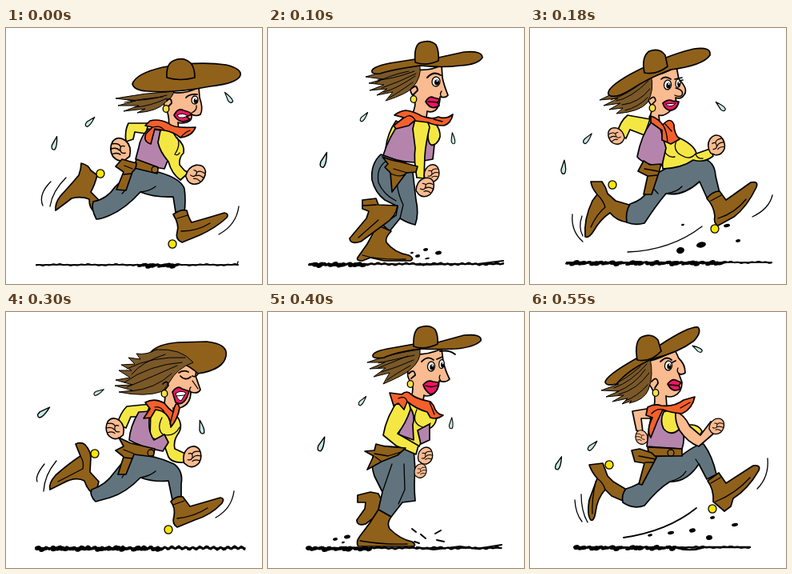
An HTML page with a canvas that plays this animation: 320 by 320 pixels, repeating every 0.6 s.

```html
<!DOCTYPE html>
<html lang="en">
<head>
<meta charset="utf-8">
<title>Running cowgirl</title>
<style>
html, body { margin: 0; width: 100%; height: 100%; overflow: hidden; background: #fff }
canvas { display: block; width: 100vw; height: 100vh }
</style>
</head>
<body>
<canvas width="320" height="320"></canvas>
<script>
const ctx = document.querySelector('canvas').getContext('2d');
ctx.lineCap = ctx.lineJoin = 'round';

function shape(d, color, width = 1.7) {
  const path = new Path2D(d);
  ctx.fillStyle = color;
  ctx.fill(path);
  ctx.lineWidth = width;
  ctx.strokeStyle = '#000';
  ctx.stroke(path);
}
const paint = (color, width) => (...paths) => paths.forEach(d => shape(d, color, width));
const brown = paint('#90611a'), mane = paint('#7a5828', 1), skin = paint('#fabb90');
const yellow = paint('#f5e743'), purple = paint('#b584ad'), orange = paint('#f4602b');
const pink = paint('#ea1762'), denim = paint('#61747e'), white = paint('#fff', 1);

function line(d, width = 1.3) {
  ctx.lineWidth = width;
  ctx.strokeStyle = '#000';
  ctx.stroke(new Path2D(d));
}

function oval(x, y, rx, ry, color, angle = 0, outline = true) {
  ctx.beginPath();
  ctx.ellipse(x, y, rx, ry, angle, 0, 7);
  ctx.fillStyle = color;
  ctx.fill();
  ctx.lineWidth = 1.3;
  ctx.strokeStyle = '#000';
  if (outline) ctx.stroke();
}
const spur = (x, y) => oval(x, y, 5, 5.2, '#ffe500');
const ring = (x, y) => oval(x, y, 3.8, 4.3, '#f9e23c');
const buckle = (x, y) => oval(x, y, 4, 4, '#98671d');
const clod = (x, y, rx, ry = rx * .6) => oval(x, y, rx, ry, '#000', -.2, false);

function eye(x, y, rx = 4, ry = 6) {
  oval(x, y, rx, ry, '#fff', .1);
  oval(x + 1, y + 1, rx * .6, ry * .6, '#000', 0, false);
  oval(x + 1.5, y - .8, .9, 1.1, '#fff', 0, false);
}

function at(x, y, angle, sx, sy, draw) {
  ctx.save();
  ctx.translate(x, y);
  ctx.rotate(angle);
  ctx.scale(sx, sy);
  draw();
  ctx.restore();
}
const drop = (x, y, angle, size = 1) => at(x, y, angle, size, size, () =>
  shape('M0,-8Q4,3 2,7Q-2,9 -2.5,3Z', '#c4e9e1', 1.2));
const fist = (x, y, dir = 1, size = 1, angle = 0) => at(x, y, angle, dir * size, size, () => {
  skin('M-10,9Q-13,-3 -5,-10Q4,-16 10,-9Q15,0 10,9Q3,17 -5,13Z');
  line('M10,-6Q3,-7 1,-3M12,0Q5,-2 2,2M10,6Q4,4 1,7M-4,-3Q2,-5 1,2Q0,6 -5,5');
});

function ground(x0, x1, y, width, bump, heavy0, heavy1) {
  let d = `M${x0},${y}`;
  for (let x = x0; x <= x1; x += 2)
    d += `L${x},${y + bump * Math.sin(x * .72) + .6 * Math.sin(x * .17)}`;
  line(d, width);
  line(`M${x0 + 1},${y}L${x1},${y}`, 1.6);
  for (let x = heavy0; x < heavy1; x += 5)
    clod(x, y + 1 + Math.sin(x * 1.7), 4, 2.2 + .8 * Math.sin(x));
}

const poses = [
  () => {
    ground(38, 290, 296, 1.8, .5, 168, 216);
    line('M289,296L290,292');
    line('M56,192Q40,208 46,222M75,187Q58,204 55,223M291,223Q288,246 266,258');
    drop(278, 87, -.6); drop(105, 117, .8); drop(61, 144, .3, 1.1);
    brown('M94,169Q103,171 106,178L114,184Q111,196 106,205L117,216L111,230Q104,226 104,214Q94,210 82,213Q69,223 62,228Q61,219 68,210Q81,196 91,184Q94,176 94,169Z');
    spur(118, 182);
    denim('M158,172Q170,178 190,180Q219,188 223,201Q225,215 223,230L212,230L209,211Q185,212 168,205Q149,226 130,234Q119,239 113,239Q106,226 109,217Q126,214 136,199L150,185Z');
    line('M168,205Q180,204 187,198M151,197Q149,204 145,207');
    brown('M209,233Q218,226 226,228Q228,237 232,243Q250,238 273,231Q279,232 276,237Q262,250 242,259L220,268Q211,264 214,255Q217,246 209,233Z');
    line('M219,254Q239,254 255,244M214,238L227,234');
    spur(208, 270);
    yellow('M178,119L153,119Q148,129 150,142L159,139L161,130L175,132Z');
    purple('M178,126Q168,136 166,149L162,164Q180,174 198,176L204,161Q196,150 194,128Z');
    yellow('M193,128Q205,122 213,137Q224,146 222,156Q216,162 217,171L223,178L228,181L218,190Q207,182 203,167Q192,154 190,143Z');
    line('M214,137Q219,146 211,158Q215,160 217,156');
    fist(144, 151, -1, 1.05); fist(237, 182, 1, .95, .5);
    brown('M163,164L190,174L189,182L160,175Z', 'M145,164L163,169Q163,176 158,180L150,203L138,202L147,180L137,173Z');
    line('M148,172L158,176M147,183L157,182'); buckle(186, 177);
    skin('M204,80Q223,84 241,74L242,87Q247,101 243,108Q238,111 232,108Q233,116 226,118Q218,120 215,118L216,128L203,127Q205,113 201,103Q195,98 199,87Z');
    orange('M180,116Q191,113 203,119Q210,126 237,124Q233,135 218,137Q210,130 198,128L186,126L181,145Q171,142 175,132L183,124L174,122Z');
    line('M184,124Q193,121 198,128M218,137Q224,130 230,128');
    mane('M210,79Q174,81 137,88L162,91L140,97L166,97L147,104L174,101L164,106Q190,104 199,93Q208,88 210,79Z');
    line('M201,84Q175,92 152,90M201,88Q180,98 161,99M196,86Q172,88 148,93', 1);
    line('M201,90Q207,86 207,94L203,98M225,87Q229,82 239,83', 1.8);
    ring(200, 101); eye(236, 90, 4, 5);
    line('M238,97Q239,103 232,106');
    pink('M210,109Q215,99 222,103Q231,105 232,108L226,111L230,114Q220,121 212,112Z');
    white('M214,109Q221,105 227,110Q222,113 217,112Z');
    brown('M158,70Q162,57 196,49Q240,41 275,46Q295,51 293,59Q290,69 255,73Q209,82 177,79Q160,78 158,70Z', 'M201,62Q200,45 209,41Q222,35 231,44Q236,50 236,62Q218,67 201,62Z');
  },
  () => {
    ground(52, 294, 295, 2.4, .8, 54, 120);
    line('M188,296L230,295L262,295L294,291', 2.2);
    clod(197, 277, 3); clod(213, 281, 4); clod(187, 285, 3); clod(180, 281, 2); clod(199, 288, 3, 1);
    drop(120, 111, .7, .9); drop(70, 165, .35, 1.25); drop(231, 138, -.1, .9);
    yellow('M160,116Q149,132 147,151L157,154L170,123Z', 'M200,112Q216,122 215,136Q212,148 199,147Z');
    purple('M168,113Q151,136 144,159Q160,167 183,168L206,164L208,146Q198,150 200,122L184,112Z');
    denim('M141,158Q128,170 130,190Q134,206 146,215L162,223L160,234L143,246L152,254L165,238Q175,244 184,246Q189,232 185,215L180,172Z');
    line('M150,165Q135,173 138,193Q144,208 160,216M163,182Q158,198 169,221L165,238');
    brown('M136,246L154,254Q146,262 148,268Q158,281 176,284Q184,288 178,291L145,291L128,287L118,291Q110,291 112,287L124,270Q131,258 136,246Z');
    line('M118,284Q138,290 172,289');
    brown('M118,215L135,213L138,221L162,222Q160,236 146,245L116,267Q103,271 102,263L123,238L126,229L118,226Z');
    line('M119,222L136,221M113,262L138,240');
    yellow('M185,109Q198,109 202,124Q197,145 196,160L195,188L186,187Q182,165 184,150L181,126Z');
    fist(204, 181, 1, .8); fist(196, 198, 1, .9, .3);
    brown('M143,161Q155,166 164,167L187,173L185,180L173,181L155,205L153,181L146,174L150,170Z');
    line('M157,176L174,181M153,182Q165,187 171,183');
    skin('M184,52Q204,54 217,46L218,62Q220,72 225,84Q222,88 215,86Q215,98 209,103Q204,106 199,104L198,112L180,108Q186,97 183,86Q177,82 178,73Z');
    orange('M172,103Q182,104 192,110Q205,115 213,111Q222,115 231,108Q229,119 220,122Q208,122 200,118L183,116L176,122L160,126L157,122L170,112L158,109Q164,104 172,103Z');
    line('M171,112Q178,106 184,115M207,114L218,117');
    mane('M190,47Q151,52 122,61L144,64L126,69L145,71L127,78L149,76L136,84L156,80L147,91Q175,82 181,74Q192,62 190,47Z');
    line('M183,54Q156,64 137,65M184,60Q161,76 145,80M176,54Q148,60 134,69M181,68Q164,80 152,87M185,57Q165,67 142,75', 1);
    ring(182, 89); eye(210, 67, 5, 6);
    line('M179,76Q186,69 187,78L182,83M199,62Q207,53 216,59', 2);
    line('M217,79Q214,83 217,86');
    pink('M197,92Q202,84 207,87L215,89L212,93L214,97Q204,104 197,92Z'); line('M200,92L212,93');
    brown('M130,55Q128,49 152,44L184,39L213,37L245,30Q268,28 268,37Q262,46 240,47Q220,50 190,47Q155,52 140,57Q131,58 130,55Z', 'M184,43Q182,21 191,18Q203,14 210,21Q214,29 213,41Q198,48 184,43Z');
  },
  () => {
    ground(46, 302, 293, 2, .5, 48, 246);
    line('M53,233Q51,254 66,267M65,235Q60,249 66,260M122,280Q176,278 215,248M303,209Q299,226 278,236');
    clod(214, 271, 6, 3.5); clod(188, 278, 5, 4); clod(260, 266, 3); clod(246, 247, 4, 2); clod(191, 246, 2);
    drop(238, 98, -.8); drop(72, 138, .7); drop(42, 174, .1, 1.1);
    brown('M76,192L90,192Q95,199 97,207L107,216L124,221L122,243Q108,241 100,231Q88,239 80,253Q74,263 69,261Q67,239 78,216L84,208Q77,200 76,192Z');
    line('M84,208Q92,216 94,224Q83,233 76,249'); spur(103, 196);
    denim('M160,181Q184,166 215,163Q231,166 232,185L237,206L221,212L212,192Q191,211 170,207Q158,221 143,244Q131,247 121,243Q119,230 125,220Q141,215 148,203Z');
    line('M170,207Q184,205 190,198M153,199L160,207');
    brown('M221,213Q228,204 237,204L245,215L276,193Q286,191 283,199Q271,224 255,236L235,247Q229,244 231,235Q230,223 221,213Z');
    line('M235,238Q257,231 270,214M226,216L239,209'); spur(231, 251);
    yellow('M150,114L122,109Q112,117 109,132L120,138L125,127L143,134Z');
    fist(108, 134, -1, .8, -.4);
    yellow('M162,125L188,138Q206,147 208,157L225,151L229,160Q218,169 204,165Q190,175 166,176Z');
    line('M183,141Q178,153 189,159Q200,166 207,157M166,151Q172,163 181,161M207,158Q210,164 216,163');
    fist(232, 146, 1, .9, -.3);
    purple('M152,117Q139,134 134,161Q143,172 165,172L170,150L162,123Z');
    brown('M142,166L150,171L164,170L161,181L152,208L142,208L147,185L135,179Z'); line('M143,176L160,179M148,185L159,184');
    skin('M149,61Q170,57 183,48L186,64Q198,76 193,83Q189,90 182,87Q185,97 176,103Q168,111 161,109L162,118L149,112Q154,103 151,96Q145,88 148,78Z');
    orange('M151,110Q160,113 166,121Q176,110 180,121Q180,132 187,139L176,145L165,140L165,128L151,118Z');
    line('M166,121Q171,128 172,143M169,120L177,129');
    mane('M151,58Q119,75 87,90L110,88L92,97L113,94L99,102L116,100L108,107Q137,105 147,93Q156,77 151,58Z');
    line('M148,66Q126,88 108,91M150,76Q136,94 115,96M142,67Q120,84 101,90M147,87Q135,99 119,103', 1);
    ring(153, 100); eye(172, 71, 4.5, 6); eye(185, 69, 3, 5.2);
    line('M150,89Q156,83 157,91L153,95M164,64Q169,59 176,64M181,64L190,62M187,66L191,65', 1.7);
    line('M182,75Q193,78 190,84Q187,87 181,84');
    pink('M166,94Q173,88 178,91L186,92Q184,103 174,103Q168,101 166,94Z');
    white('M170,95L182,94Q178,99 172,97Z');
    brown('M98,83Q95,75 125,58Q170,34 205,26Q227,23 225,34Q216,47 176,52Q147,63 126,77Q105,90 98,83Z', 'M143,56Q139,36 149,29Q162,24 169,34L172,48Q158,59 143,56Z');
  },
  () => {
    ground(38, 299, 295, 3, 1.5, 40, 195);
    line('M48,190Q36,205 39,212M63,186Q48,204 47,224M285,224Q282,246 262,257');
    drop(244, 144, -.2, 1.1); drop(116, 100, 1.1, .9); drop(47, 125, .9, 1.2);
    brown('M87,165Q94,162 99,166Q106,174 106,182L105,200L116,212L112,228Q103,226 98,211Q87,205 71,214L55,222Q53,214 62,204Q79,189 93,180Z');
    line('M93,180Q98,188 96,196L65,212'); spur(111, 177);
    denim('M155,177Q185,178 210,190Q222,199 219,215L219,234L208,235L203,211Q185,213 168,207Q150,226 130,232L112,237Q104,229 107,222Q125,216 135,201L148,185Z');
    line('M168,207Q180,205 187,199M151,198L145,207');
    brown('M206,237Q213,229 221,231L230,243L268,232Q274,233 270,239Q256,254 236,260L214,269Q207,265 210,255Q212,245 206,237Z');
    line('M214,258Q235,256 252,245M209,241L223,236'); spur(203, 272);
    yellow('M181,115L151,118Q143,126 139,140L150,145L156,131L174,131Z');
    fist(137, 145, -1, .95);
    yellow('M181,120Q205,116 211,127Q224,141 214,154Q209,162 211,171L224,177L222,188Q207,189 203,181L197,164L180,156Z');
    fist(232, 180, 1, .95);
    purple('M166,125Q155,143 154,160Q169,169 196,174L203,163L198,153L185,160Q175,146 181,124Z');
    line('M195,132Q188,146 196,153Q210,157 217,144');
    brown('M141,157L156,164L186,171L184,181L160,178L150,203L140,203L147,181L137,173L147,168Z');
    line('M147,172L162,178M148,182L158,183'); buckle(181, 176);
    skin('M230,58Q240,71 237,80L243,97Q240,103 231,100Q231,114 220,119Q211,122 209,120L210,128L196,122Q201,107 197,97Q195,83 205,75Z');
    orange('M174,113Q186,107 198,114Q203,121 209,125Q213,107 217,120Q215,133 206,144Q206,130 195,124L187,122L181,132L172,133L180,121Z');
    line('M186,119Q193,117 198,125M209,125L205,140');
    brown('M181,50Q190,40 215,38L251,37Q278,40 275,55Q272,72 240,77Q225,62 181,50Z');
    mane('M188,47Q219,45 234,63Q214,70 204,88L196,99Q175,107 141,100L158,98L136,92L158,91L137,85L155,82L141,73L157,73L144,66L161,65L153,57L168,59L163,52Q176,54 188,47Z');
    line('M224,57Q183,55 151,71M220,63Q179,66 148,88M214,67Q185,80 151,94M207,77Q187,96 156,99M199,53Q170,62 157,78', 1);
    ring(198, 102);
    line('M196,90Q202,84 203,92L199,97M218,80Q224,87 231,81M233,80Q238,82 240,77M216,76Q222,72 228,75', 1.7);
    line('M233,86L240,96M231,100Q228,97 231,94');
    pink('M208,100Q214,91 220,96L229,99L226,107Q220,118 212,113Z');
    white('M212,102Q218,97 225,101L219,111Q214,110 212,102Z');
    line('M213,105L223,104', 1);
  },
  () => {
    ground(49, 292, 295, 2.4, .7, 51, 128);
    line('M186,294L207,297L240,293L261,296L292,291', 2.2);
    line('M180,271L185,275M191,278L197,283M209,277L216,273M211,285L220,287M183,287L189,289', 2);
    clod(99, 281, 4); clod(84, 284, 3); clod(94, 288, 2);
    drop(118, 111, .7, .9); drop(67, 165, .4, 1.2); drop(229, 139, .1, .9);
    brown('M112,229L128,225L138,227L144,240L140,251L122,265Q111,268 111,260L121,246L122,238L112,238Z');
    denim('M137,167Q126,185 133,205L143,225L138,247L154,256L168,238L184,236Q182,215 184,198L182,170Z');
    line('M170,190L171,222L163,240M143,225L155,190');
    brown('M138,247L154,256Q148,264 152,271Q165,284 180,287Q187,292 180,293L113,293Q109,288 115,280Q128,264 138,247Z');
    line('M115,286Q143,291 174,290');
    fist(190, 198, 1, .65);
    yellow('M176,108Q206,115 211,130Q210,144 198,147L189,168L168,165L172,130Z');
    line('M186,122Q179,138 191,143Q199,147 203,139');
    purple('M177,118Q185,130 181,141L182,160L163,153Z', 'M187,148L202,140L202,160L191,165Z');
    yellow('M165,107Q177,108 178,122Q172,140 162,152L188,167L185,178L160,167L144,154Q148,130 165,107Z');
    fist(196, 179, 1, .78);
    brown('M135,165L146,168L172,170L162,179L142,187L124,197L132,180L121,174L133,173Z');
    line('M133,177L150,180L166,175M134,181L142,187');
    skin('M179,53Q200,54 217,46L219,61Q221,72 227,84Q222,89 214,86Q214,99 204,104Q197,106 195,104L194,111L179,105Q183,96 179,88Q173,81 175,74Z');
    orange('M152,101L167,103Q174,97 179,103Q186,109 203,112L207,117Q210,128 219,129Q211,135 203,132L199,125Q185,121 174,112L170,122L163,114L157,117Z');
    line('M163,108Q172,104 174,112M202,113L208,128');
    mane('M190,47Q157,51 124,63L146,63L127,71L147,70L132,81L152,76L144,90Q170,79 178,72Q192,60 190,47Z');
    line('M183,54Q155,60 138,64M182,60Q162,69 142,75M178,67Q160,77 149,85M175,55Q152,64 138,70', 1);
    ring(178, 90); eye(204, 68, 4.5, 6); eye(217, 65, 3.2, 5.5);
    line('M176,77Q183,70 184,79L179,83M192,62Q200,54 207,60M211,59L218,56M215,49Q227,47 234,53', 1.8);
    line('M215,79Q213,83 216,86');
    pink('M194,91Q200,84 206,87L213,88Q213,101 203,103Q196,98 194,91Z'); line('M197,92Q204,95 211,92');
    brown('M131,55Q130,49 155,45L183,40L212,38L245,29Q268,27 266,36Q258,44 235,46Q210,47 190,46Q160,50 145,57Q132,59 131,55Z', 'M182,43Q181,22 190,19Q202,15 209,22Q213,30 212,40Q196,48 182,43Z');
  },
  () => {
    ground(56, 275, 294, 2, .6, 58, 182);
    line('M180,294Q200,300 218,294L275,294', 2.4);
    line('M56,235Q57,252 65,262M64,228Q64,249 72,263M297,183Q299,206 284,221');
    line('M117,282Q172,274 208,245', 1.8);
    clod(176, 276, 4, 2); clod(203, 273, 4, 2.5); clod(224, 282, 4, 3); clod(228, 257, 3); clod(150, 279, 3, 1.5); clod(256, 266, 4, 2);
    drop(209, 46, -1, .9); drop(78, 167, .8); drop(36, 189, .4, 1.1);
    brown('M74,191L91,189L97,205L104,212L119,221L116,236L102,230L94,222Q84,233 82,250Q80,262 76,260Q71,254 74,235L84,208Q77,200 74,191Z');
    line('M84,208Q92,214 94,222M82,212Q77,236 78,252'); spur(99, 191);
    denim('M149,181L190,179Q208,165 217,165Q228,180 233,203L221,209L211,190Q196,213 175,212Q160,221 143,242Q129,247 116,238Q114,228 120,221Q137,216 145,207Z');
    line('M175,212Q190,208 195,199M211,190L207,184');
    brown('M222,211L236,201L245,214L279,192Q289,191 286,198Q272,222 254,233L251,243L243,249L229,237Q230,222 222,211Z');
    line('M232,237Q257,227 275,207M226,214L238,207'); spur(228, 246);
    skin('M152,120L128,124L133,148L141,150L139,133L152,133Z'); fist(140, 156, -1, .65);
    yellow('M190,143Q209,137 215,149Q211,161 196,158Z');
    purple('M153,122Q148,145 146,168L190,171Q194,160 191,146L181,123Z');
    yellow('M167,125Q178,119 184,129L186,147Q176,156 167,146Q162,136 167,125Z');
    skin('M182,125Q192,127 200,143L213,154L226,137L234,148L211,168Q197,163 187,148Q181,137 182,125Z');
    fist(233, 142, 1, .75, .3);
    brown('M147,169L190,171L190,180L149,180Z', 'M127,173L137,171L152,176L158,182L140,216L136,215L143,189L131,187Z');
    line('M136,180L157,184M144,188L155,188'); buckle(176, 176);
    skin('M147,62Q167,57 181,47L186,58Q194,65 194,76Q190,79 186,77L190,88Q190,101 180,105Q174,107 170,105L171,118L155,119Q158,104 152,95Q144,85 148,76Z');
    orange('M147,119Q156,114 164,117Q180,119 192,110L206,106Q203,121 190,127Q176,126 166,122L159,137L151,157Q145,147 153,132L145,129Z');
    line('M152,127Q160,119 167,123M188,120L200,113');
    mane('M150,58Q121,73 98,90L111,90L89,98L111,99L95,106L117,104L103,112L122,108L115,115L127,111L124,114Q143,110 148,97Q155,79 150,58Z');
    line('M146,65Q127,87 105,95M149,76Q134,97 111,103M138,68Q119,85 103,91M147,91Q134,106 119,111M144,72Q130,92 108,100', 1);
    ring(157, 101); eye(173, 67, 4.5, 6);
    line('M152,87Q159,79 160,89L156,95M163,62Q171,54 177,60M178,63L182,61', 1.8);
    line('M185,70Q183,74 186,77');
    pink('M172,90Q178,82 184,86L189,88L186,92L188,96Q178,102 172,90Z'); line('M174,91L186,92');
    brown('M94,88Q94,80 133,58L163,41Q198,18 210,19Q215,25 205,36Q185,51 155,58Q125,70 108,90Q96,93 94,88Z', 'M134,60Q130,36 140,31Q152,26 160,35L164,49Q151,63 134,60Z');
  }
];

const ends = [100, 180, 300, 400, 480, 600];

function tick() {
  const time = performance.now() % 600;
  ctx.clearRect(0, 0, 320, 320);
  poses[ends.findIndex(end => time < end)]();
  requestAnimationFrame(tick);
}
tick();
</script>
</body>
</html>
```
